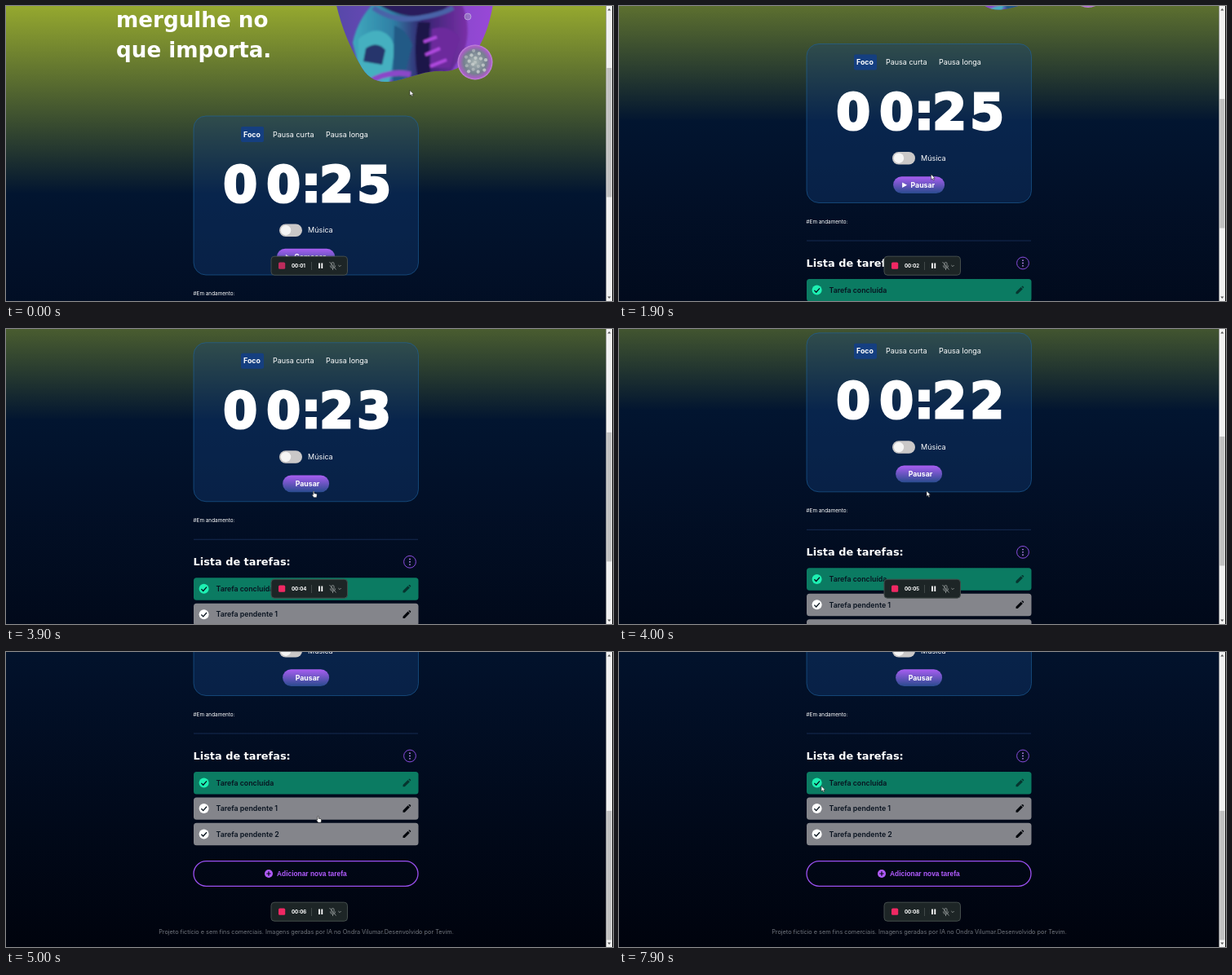
These frames come from a looping animation (744 by 362 pixels, 8000 ms). An HTML page:

```html
<!DOCTYPE html>
<html lang="pt-BR">
<head>
<meta charset="utf-8">
<title>Pomodoro</title>
<style>
html, body { margin: 0; width: 100%; height: 100%; overflow: hidden; background: #000410; }
svg { display: block; width: 744px; height: 362px; }
text { font: 9px Inter, "Open Sans", sans-serif; fill: #fff; }
.b { font-weight: 700; }
.wide { font: 700 26.2px "DejaVu Sans", sans-serif; }
.task { font-size: 8.8px; font-weight: 600; fill: #08121f; }
.mid { text-anchor: middle; }
</style>
</head>
<body>
<svg viewBox="0 0 744 362">
  <defs>
    <linearGradient id="sky" gradientUnits="userSpaceOnUse" x1="0" y1="0" x2="0" y2="639">
      <stop offset="0" stop-color="#95a82f"/>
      <stop offset=".36" stop-color="#021530"/>
      <stop offset=".5" stop-color="#021028"/>
      <stop offset="1" stop-color="#00030d"/>
    </linearGradient>
    <linearGradient id="pill" x2="0" y2="1">
      <stop offset="0" stop-color="#a95ef2"/>
      <stop offset="1" stop-color="#294b8e"/>
    </linearGradient>
    <linearGradient id="backdrop">
      <stop offset="0" stop-color="#5548a8"/>
      <stop offset="1" stop-color="#9a48d8"/>
    </linearGradient>
    <linearGradient id="suit">
      <stop offset="0" stop-color="#3fa9bd"/>
      <stop offset=".35" stop-color="#2f7fa5"/>
      <stop offset=".6" stop-color="#33246e"/>
      <stop offset="1" stop-color="#7a30a8"/>
    </linearGradient>
    <radialGradient id="ball">
      <stop offset="0" stop-color="#a9b6b4"/>
      <stop offset=".65" stop-color="#75808f"/>
      <stop offset=".9" stop-color="#a95fc4"/>
      <stop offset="1" stop-color="#c58be0"/>
    </radialGradient>
    <filter id="soft"><feGaussianBlur stdDeviation="1.2"/></filter>
    <clipPath id="blob">
      <path d="M403 -10C409 20 420 48 433 70C442 88 454 94 468 93C490 91 512 78 537 80C568 80 592 42 598 -10Z"/>
    </clipPath>
    <g id="pencil">
      <path d="M-4.5 4.5V2.2L1.6 -3.9L3.9 -1.6L-2.2 4.5Z M2.3 -4.5L3 -5.1Q3.6 -5.5 4.2 -4.9L5 -4.1Q5.5 -3.5 5 -3L4.5 -2.3Z"/>
    </g>
  </defs>

  <g id="page">
    <rect width="744" height="640" fill="url(#sky)"/>
    <text class="wide" x="135" y="26">mergulhe no</text>
    <text class="wide" x="135" y="62.5">que importa.</text>

    <g clip-path="url(#blob)">
      <rect x="400" y="-10" width="200" height="110" fill="url(#backdrop)"/>
      <g filter="url(#soft)">
        <path d="M425 45Q432 12 456 -8H556Q572 22 562 54L540 90H436Z" fill="url(#suit)"/>
        <path d="M448 -8H546Q540 10 508 12T448 -8Z" fill="#2a1f5c"/>
        <path d="M450 2Q475 20 505 15T548 2" fill="none" stroke="#4a63a8" stroke-width="6"/>
        <path d="M432 40Q452 24 466 34T474 68L470 95H430Z" fill="#45b0c0"/>
        <path d="M441 52Q455 42 465 54L461 72L438 68Z" fill="#26356c"/>
        <path d="M476 24Q492 30 498 48L486 95H474Z" fill="#235a86"/>
        <path d="M505 20Q498 55 506 95H522Q516 50 520 20Z" fill="#1d1748"/>
        <path d="M522 28Q545 22 556 40L544 76H520Z" fill="#6c2a9c"/>
        <path d="M512 44L528 38M514 60L532 52M520 74L540 66" stroke="#b04adf" stroke-width="4"/>
        <path d="M444 94Q470 78 496 84" fill="none" stroke="#8b46c8" stroke-width="7"/>
      </g>
    </g>
    <circle cx="566" cy="13" r="4" fill="#9d8fc0" fill-opacity=".6" stroke="#c9b8e8" stroke-width=".7"/>
    <circle cx="575" cy="69" r="21.5" fill="url(#ball)"/>
    <g id="beads" fill="#c9cfce"></g>

    <rect x="230" y="135" width="275.5" height="195" rx="15" fill="#144480" fill-opacity=".35" stroke="#1e64a0" stroke-opacity=".6"/>
    <rect x="288" y="148" width="28" height="19" rx="2" fill="#153f80"/>
    <text class="b" x="291" y="160.5" style="font-size:8.8px">Foco</text>
    <text x="327" y="160.5">Pausa curta</text>
    <text x="392" y="160.5">Pausa longa</text>
    <text id="clock" class="wide mid" x="287 340 374 405 451" y="239.6" style="font-size:60px" stroke="#fff" stroke-width="3"></text>
    <rect x="335" y="267.5" width="28" height="15.5" rx="7.75" fill="#cac8c8"/>
    <circle cx="343" cy="275.2" r="6.2" fill="#f5f5f5"/>
    <text x="370" y="278.3">Música</text>
    <rect id="button" y="297.7" height="20.8" rx="10.4" fill="url(#pill)"/>
    <path id="play" fill="#fff"/>
    <text id="label" class="b" y="311.2" style="font-size:8.7px"></text>

    <text x="229.5" y="355" style="font-size:6.4px">#Em andamento:</text>
    <path d="M230 376.5H505" stroke="#1c3560" stroke-opacity=".75"/>
    <text class="wide" x="229.5" y="408" style="font-size:12.9px">Lista de tarefas:</text>
    <circle cx="495" cy="404" r="7.4" fill="none" stroke="#8a4de0"/>
    <path d="M495 400.7v.01M495 404v.01M495 407.3v.01" stroke="#b98af0" stroke-width="1.8" stroke-linecap="round"/>
    <g id="tasks"></g>
    <rect x="230" y="533.2" width="275" height="30.6" rx="15.3" fill="none" stroke="#9a50f0" stroke-width="1.3"/>
    <circle cx="322" cy="548.5" r="5" fill="#b25cff"/>
    <path d="M319.3 548.5h5.4M322 545.8v5.4" stroke="#01060f" stroke-width="1.2"/>
    <text class="b" x="332" y="551.4" style="font:700 8.4px 'Liberation Sans',Arial,sans-serif;fill:#b25cff">Adicionar nova tarefa</text>
    <text class="mid" x="368" y="622.8" style="font-size:7.3px;fill:#70757c">Projeto fictício e sem fins comerciais. Imagens geradas por IA no Ondra Vilumar.Desenvolvido por Tevim.</text>
  </g>

  <rect x="735.5" width="8.5" height="362" fill="#0a0a0a"/>
  <rect x="735.5" width="7.5" height="362" fill="#f1f1f1"/>
  <rect id="thumb" x="736.3" width="6" height="158.5" fill="#c1c1c1"/>
  <path d="M737.3 5.5l2 -2.5l2 2.5zM737.3 356.5l2 2.5l2 -2.5z" fill="#555"/>

  <rect x="325" y="307.2" width="93.5" height="23" rx="4" fill="#1d2526" stroke="#444d4c"/>
  <rect id="record" x="334" y="314.6" width="8.2" height="8.2" rx="1.6"/>
  <text id="elapsed" class="b" x="350" y="321" style="font-size:6.1px"></text>
  <path d="M374.5 314v10" stroke="#4a5252" stroke-width=".8"/>
  <path d="M384 315.5v6.6M387.3 315.5v6.6" stroke="#fff" stroke-width="1.8"/>
  <g fill="none" stroke="#858b8b" stroke-width="1">
    <rect x="399" y="314.5" width="3" height="5.5" rx="1.5"/>
    <path d="M397.3 318.5Q397.5 321.6 400.5 321.6T403.7 318.5M400.5 321.6V324M396.5 314L404.5 323.5M407.3 318l1.7 1.7l1.7 -1.7"/>
  </g>

  <g id="cursor">
    <path id="arrow" d="M0 0V6.6L1.6 5.2L2.7 7.6L3.8 7.1L2.8 4.8H4.8Z" fill="#fff" stroke="#111" stroke-width=".5"/>
    <path id="hand" d="M-.7 .4Q0 -.5 .6 .4V2.8L3.4 3.4Q4.2 3.7 4.1 4.6L3.6 7.8H.2L-2 4.9Q-1.9 4 -.7 4.7Z" fill="#fff" stroke="#111" stroke-width=".5"/>
  </g>
</svg>
<script>
const LOOP = 8000;
const $ = id => document.getElementById(id);
const set = (id, attrs) => { for (const k in attrs) $(id).setAttribute(k, attrs[k]); };
const linear = u => u;
const smooth = u => u * u * (3 - 2 * u);
const clockText = s => '00:' + String(s).padStart(2, '0');

// Keys are [time, ...values].
function track(keys, t, ease) {
  const i = keys.findIndex(k => k[0] > t);
  if (i < 0) return keys[keys.length - 1].slice(1);
  if (i === 0) return keys[0].slice(1);
  const [a, b] = [keys[i - 1], keys[i]];
  const u = ease((t - a[0]) / (b[0] - a[0]));
  return a.slice(1).map((v, n) => v + (b[n + 1] - v) * u);
}

const scrollStart = [[50, 0], [750, 88.5]];
const scrollRest = [[3650, 88.5], [4000, 130], [4300, 179], [4800, 276.5]];
const pointer = [
  [50, 495, 103.5], [850, 383, 214], [1350, 383, 214], [1850, 382.5, 206.5],
  [2650, 382.5, 206.5], [3250, 379.5, 200.8], [4000, 377, 198.8], [4300, 376, 202.3],
  [4900, 382.5, 201.5], [5400, 382.5, 201.5], [5700, 488, 190], [6500, 488, 190],
  [7400, 257, 162], [7700, 248, 164.5]
];

const taskTop = i => 423.5 + i * 31.4;
$('tasks').innerHTML = ['Tarefa concluída', 'Tarefa pendente 1', 'Tarefa pendente 2'].map((name, i) => {
  const y = taskTop(i), mid = y + 13.6;
  return `<rect x="230" y="${y}" width="275.5" height="27.4" rx="3.5" fill="${i ? '#84858b' : '#0b7b62'}"/>
    <circle cx="242.6" cy="${mid}" r="6" fill="${i ? '#fff' : '#1df0b2'}"/>
    <path d="M239.4 ${mid + .3}l2.3 2.3l4.3 -4.8" fill="none" stroke="#06121c" stroke-width="1.3"/>
    <text class="task" x="257.5" y="${mid + 3.2}">${name}</text>
    <use href="#pencil" x="491" y="${mid + .2}" fill="${i ? '#04070c' : '#06352f'}"/>`;
}).join('');

$('beads').innerHTML = Array.from({ length: 17 }, (_, i) => {
  const r = 3.7 * Math.sqrt(i), a = i * 2.4;
  return `<circle cx="${575 + r * Math.cos(a)}" cy="${69 + r * Math.sin(a)}" r="2.1" opacity="${i % 3 ? .8 : .5}"/>`;
}).join('');

function drawButton(t) {
  const running = t >= 1000, icon = t < 2000;
  const width = !running ? 71.5 : icon ? 63 : 57;
  const left = 367.6 - width / 2;
  set('button', { x: left, width });
  set('play', { d: `M${left + 11} 305l6 3.2l-6 3.2z`, opacity: +icon });
  set('label', { x: left + (icon ? 21.5 : 15.7) });
  $('label').textContent = running ? 'Pausar' : 'Começar';
  return { left, right: left + width };
}

function draw(t) {
  const second = Math.floor(t / 1000);
  const [scroll] = t < 2000 ? track(scrollStart, t, smooth) : track(scrollRest, t, linear);
  set('page', { transform: `translate(0 ${-scroll})` });
  set('thumb', { y: 76 + scroll * .43 });

  $('clock').textContent = clockText(25 - Math.max(0, second - 1));
  $('elapsed').textContent = clockText(second + 1);
  set('record', { fill: t < 100 ? '#bd2c5c' : '#f02863' });
  const button = drawButton(t);

  const [x, y] = track(pointer, t, smooth);
  const pageY = y + scroll;
  const onButton = x > button.left && x < button.right && pageY > 297.7 && pageY < 318.5;
  const onTask = [1, 2].some(i => pageY > taskTop(i) && pageY < taskTop(i) + 27.4);
  const hand = onButton || (onTask && x > 230 && x < 505);
  set('cursor', { transform: `translate(${x} ${y})` });
  set('hand', { opacity: +hand });
  set('arrow', { opacity: +!hand });
}

const start = performance.now();
function tick() {
  draw((performance.now() - start) % LOOP);
  requestAnimationFrame(tick);
}
draw(0);
requestAnimationFrame(tick);
</script>
</body>
</html>
```
